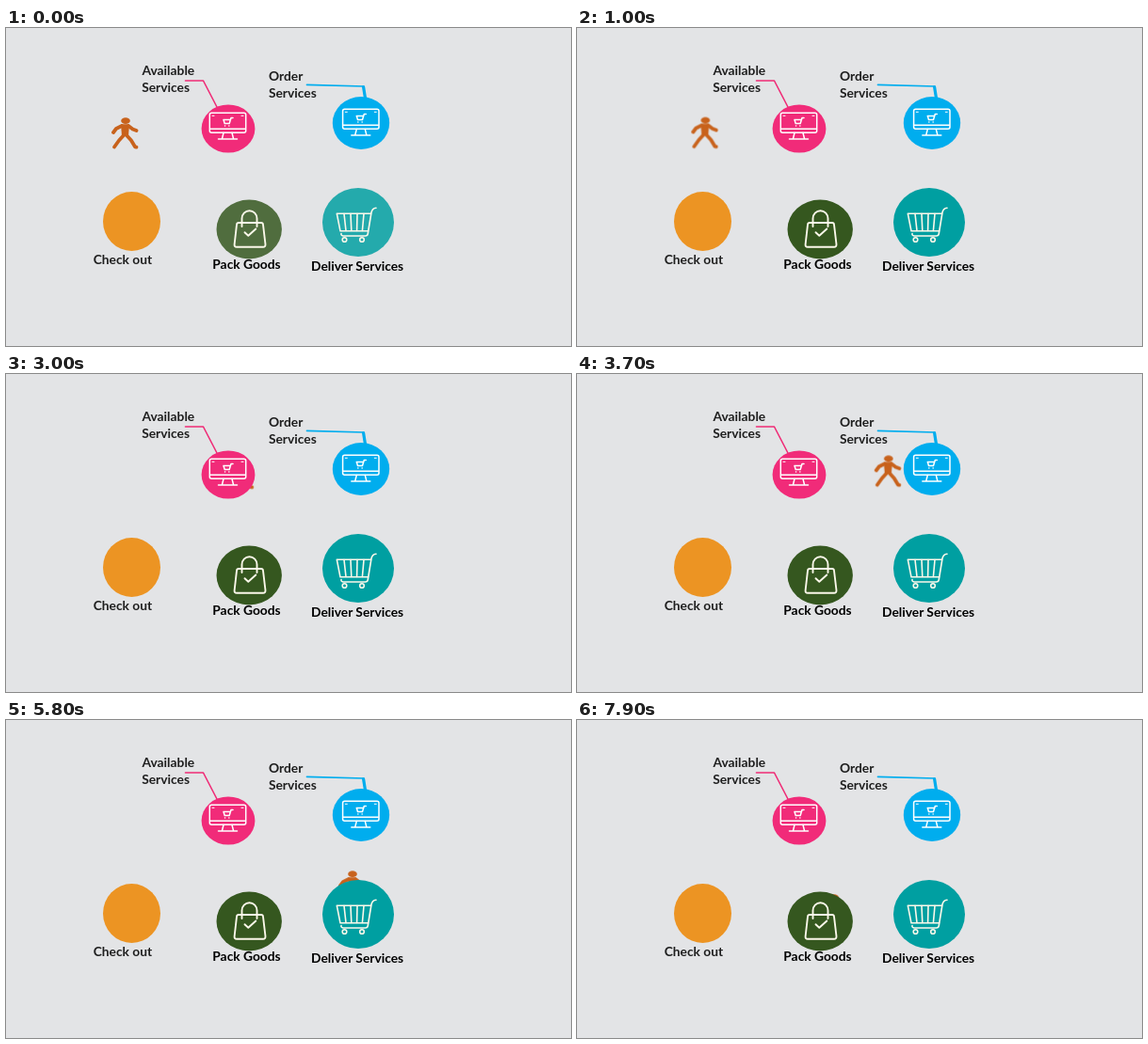
An HTML page that plays this animation: 600x338 px, repeating every 8 s.

```html
<!DOCTYPE html>
<html lang="en">
<head>
<meta charset="utf-8">
<title>Service steps</title>
<style>
  html, body { margin: 0; width: 100%; height: 100%; overflow: hidden; background: #e3e4e6; }
  svg { display: block; width: 100vw; height: 100vh; }
  text { font: 700 13.8px Carlito, Lato, sans-serif; fill: #1f1f1f; }
  .black { fill: #000; }
  .line { fill: none; stroke-linecap: round; stroke-linejoin: round; }
  .icon { stroke: #fff; stroke-width: 1.5; }
  .cream { stroke: #fbf8ea; stroke-width: 1.9; }
  #man { fill: #c8621c; animation: walk 8s linear infinite; }
  #man .line { fill: none; stroke: #c8621c; stroke-width: 3.8; }
  #late { animation: appear 8s linear infinite; }

  /* One walk of 1.2 s every 2 s, from stop to stop. */
  @keyframes walk {
    0%, 11.25% { transform: translate(126px, 112px); }
    26.25%, 36.25% { transform: translate(237px, 106px); }
    51.25%, 61.25% { transform: translate(376px, 102px); }
    76.25%, 86.25% { transform: translate(364px, 202px); }
    100% { transform: translate(263px, 202px); }
  }
  @keyframes appear {
    0%, 1% { opacity: .84; }
    3%, 100% { opacity: 1; }
  }
</style>
</head>
<body>
<svg viewBox="0 0 600 338">
  <defs>
    <g id="monitor" class="line icon">
      <rect x="216.3" y="90.3" width="38.4" height="21" rx="2"/>
      <path d="M217 107.3h37M231 111.5l-1.5 6M240 111.5l1.5 6M225.5 118h20"/>
      <path d="M219 93.3h2M250 93.3h2" stroke-width="1"/>
      <path d="M241 95.5h-2l-1.8 6h-5l-1.2-4h7.5M232.5 104h.1M236.8 104h.1"/>
    </g>
  </defs>

  <g id="man">
    <ellipse cx="1" cy="-13.3" rx="4.8" ry="3.4"/>
    <path d="M-4 -9.8H5L4 3H-3Z"/>
    <path class="line" d="M-3 -8L-9 -5L-12 -1M4 -8L8.5 -4.5L12.5 -3"/>
    <path class="line" d="M-1 2L-6 7.5L-11 14.5M2 2L7 7.5L11 14.3L12.5 14.6"/>
  </g>

  <path class="line" d="M190.5 56H209.5L224.5 85" stroke="#ef2b76" stroke-width="1.6"/>
  <path class="line" d="M319.5 60.3L380 62" stroke="#00adee" stroke-width="1.7"/>
  <path class="line" d="M379.6 62.8L381.4 74" stroke="#00adee" stroke-width="3.2"/>

  <ellipse cx="236" cy="107" rx="28.4" ry="25.6" fill="#f12b79"/>
  <ellipse cx="377" cy="101" rx="30.2" ry="28" fill="#00adee"/>
  <ellipse cx="133.5" cy="205.5" rx="30.5" ry="31.5" fill="#ec9423"/>
  <g id="late">
    <ellipse cx="258.2" cy="214" rx="34.7" ry="31.5" fill="#35571f"/>
    <ellipse cx="374" cy="206.5" rx="38" ry="36.5" fill="#009fa1"/>
  </g>

  <use href="#monitor"/>
  <use href="#monitor" x="141.3" y="-4"/>

  <!-- bag -->
  <g class="line cream">
    <path d="M247 207H271Q272.8 207 273 209L275.5 230Q275.6 232.8 273 232.8H245Q242.3 232.8 242.6 230L245 209Q245.2 207 247 207Z"/>
    <path d="M250.5 211V202.5A8 8.3 0 0 1 266.5 202.5V211"/>
    <path d="M253.5 217.2L257.3 220.7L265.3 213.5"/>
  </g>

  <!-- cart -->
  <g class="line cream" style="stroke-width: 1.6">
    <path d="M393 191.2Q389 191.5 388 196L384.3 218.5Q384 221 381.5 221H358Q355.5 220.5 356 218.5"/>
    <path d="M387.5 197.2H351.3L355 215.8H384.5"/>
    <path d="M359 197.5l2 18M366 197.5l.8 18M373 197.5l-.4 18M380 197.5l-1.6 18"/>
    <circle cx="359.5" cy="225" r="2.3"/>
    <circle cx="378" cy="225" r="2.3"/>
  </g>

  <text x="144.5" y="50.2">Available</text>
  <text x="144.2" y="68.2">Services</text>
  <text x="279" y="56">Order</text>
  <text x="278.9" y="74.2">Services</text>
  <text x="92.7" y="251.2">Check out</text>
  <text class="black" x="219.3" y="256.3">Pack Goods</text>
  <text class="black" x="324" y="258.2">Deliver Services</text>
</svg>
</body>
</html>
```
